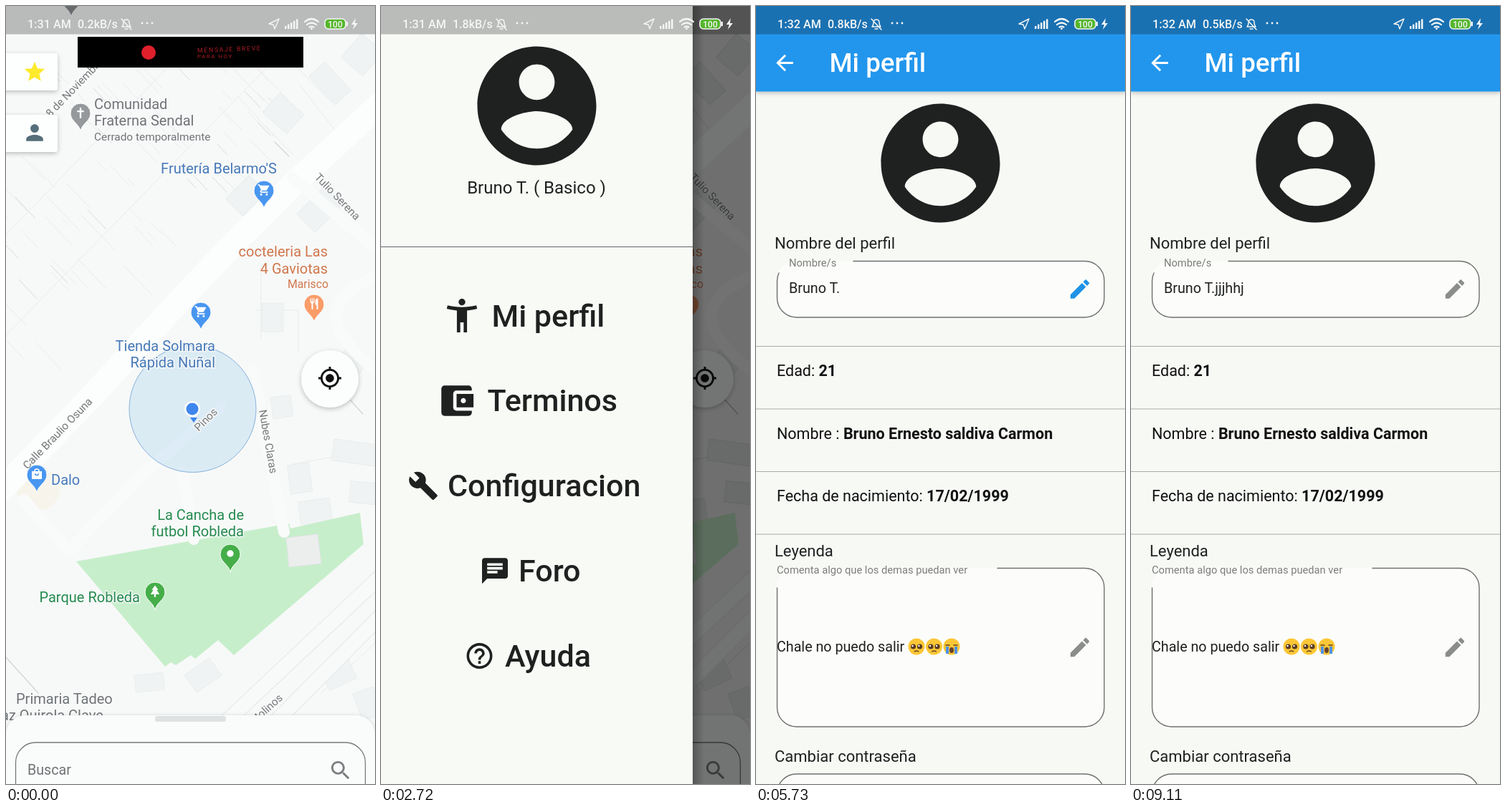
Recreate the animation shown at these times as an HTML page. Size 515 by 1087 pixels, loop 9.65 s.

```html
<!DOCTYPE html>
<html lang="es">
<head>
<meta charset="utf-8">
<style>
html, body { margin: 0; height: 100%; overflow: hidden; background: #f1f3f1; }
svg { display: block; width: 100vw; height: 100vh; }
text { font-family: Roboto, "Noto Sans", sans-serif; white-space: pre; }
.halo { paint-order: stroke; stroke: #f8f9f9; stroke-width: 3px; stroke-linejoin: round; }
.line { fill: none; stroke-linecap: round; stroke-linejoin: round; }
</style>
</head>
<body>
<svg id="stage" viewBox="0 0 515 1087"></svg>
<script>
const LOOP = 9650, INK = '#1f2120', BLUE = '#2196ed';

// 24-unit icon outlines
const ICON = {
  account: 'M12 2C6.48 2 2 6.48 2 12s4.48 10 10 10 10-4.48 10-10S17.52 2 12 2zm0 3c1.66 0 3 1.34 3 3s-1.34 3-3 3-3-1.34-3-3 1.34-3 3-3zm0 14.2c-2.5 0-4.71-1.28-6-3.22.03-1.99 4-3.08 6-3.08 1.99 0 5.97 1.09 6 3.08-1.29 1.94-3.5 3.22-6 3.22z',
  body: 'M20.5 6c-2.61.7-5.67 1-8.5 1s-5.89-.3-8.5-1L3 8c1.86.5 4 .83 6 1v13h2v-6h2v6h2V9c2-.17 4.14-.5 6-1l-.5-2zM12 6c1.1 0 2-.9 2-2s-.9-2-2-2-2 .9-2 2 .9 2 2 2z',
  wallet: 'M21 18v1c0 1.1-.9 2-2 2H5c-1.11 0-2-.9-2-2V5c0-1.1.89-2 2-2h14c1.1 0 2 .9 2 2v1h-9c-1.11 0-2 .9-2 2v8c0 1.1.89 2 2 2h9zm-9-2h10V8H12v8zm4-2.5c-.83 0-1.5-.67-1.5-1.5s.67-1.5 1.5-1.5 1.5.67 1.5 1.5-.67 1.5-1.5 1.5z',
  wrench: 'M22.7 19l-9.1-9.1c.9-2.3.4-5-1.5-6.9-2-2-5-2.4-7.4-1.3L9 6 6 9 1.6 4.7C.4 7.1.9 10.1 2.9 12.1c1.9 1.9 4.6 2.4 6.9 1.5l9.1 9.1c.4.4 1 .4 1.4 0l2.3-2.3c.5-.4.5-1.1.1-1.4z',
  chat: 'M20 2H4c-1.1 0-1.99.9-1.99 2L2 22l4-4h14c1.1 0 2-.9 2-2V4c0-1.1-.9-2-2-2zM6 9h12v2H6V9zm8 5H6v-2h8v2zm4-6H6V6h12v2z',
  help: 'M11 18h2v-2h-2v2zm1-16C6.48 2 2 6.48 2 12s4.48 10 10 10 10-4.48 10-10S17.52 2 12 2zm0 18c-4.41 0-8-3.59-8-8s3.59-8 8-8 8 3.59 8 8-3.59 8-8 8zm0-14c-2.21 0-4 1.79-4 4h2c0-1.1.9-2 2-2s2 .9 2 2c0 2-3 1.75-3 5h2c0-2.25 3-2.5 3-5 0-2.21-1.79-4-4-4z',
  edit: 'M3 17.25V21h3.75L17.81 9.94l-3.75-3.75L3 17.25zM20.71 7.04c.39-.39.39-1.02 0-1.41l-2.34-2.34c-.39-.39-1.02-.39-1.41 0l-1.83 1.83 3.75 3.75 1.83-1.83z',
  back: 'M20 11H7.83l5.59-5.59L12 4l-8 8 8 8 1.41-1.41L7.83 13H20v-2z',
  search: 'M15.5 14h-.79l-.28-.27C15.41 12.59 16 11.11 16 9.5 16 5.91 13.09 3 9.5 3S3 5.91 3 9.5 5.91 16 9.5 16c1.61 0 3.09-.59 4.23-1.57l.27.28v.79l5 4.99L20.49 19l-4.99-5zm-6 0C7.01 14 5 11.99 5 9.5S7.01 5 9.5 5 14 7.01 14 9.5 11.99 14 9.5 14z',
  person: 'M12 12c2.21 0 4-1.79 4-4s-1.79-4-4-4-4 1.79-4 4 1.79 4 4 4zm0 2c-2.67 0-8 1.34-8 4v2h16v-2c0-2.66-5.33-4-8-4z',
  star: 'M12 17.27L18.18 21l-1.64-7.03L22 9.24l-7.19-.61L12 2 9.19 8.63 2 9.24l5.46 4.73L5.82 21z',
  gps: 'M12 8c-2.21 0-4 1.79-4 4s1.79 4 4 4 4-1.79 4-4-1.79-4-4-4zm8.94 3c-.46-4.17-3.77-7.48-7.94-7.94V1h-2v2.06C6.83 3.52 3.52 6.83 3.06 11H1v2h2.06c.46 4.17 3.77 7.48 7.94 7.94V23h2v-2.06c4.17-.46 7.48-3.77 7.94-7.94H23v-2h-2.06zM12 19c-3.87 0-7-3.13-7-7s3.13-7 7-7 7 3.13 7 7-3.13 7-7 7z',
  cart: 'M7 18a2 2 0 100 4 2 2 0 000-4zM1 2v2h2l3.6 7.59-1.35 2.45C4.5 15.4 5.5 17 7 17h12v-2H7.42l-.22-.37.9-1.63h7.45c.75 0 1.41-.41 1.75-1.03l3.58-6.49A1 1 0 0020 4H5.21l-.94-2H1zm16 16a2 2 0 100 4 2 2 0 000-4z',
  cross: 'M10.5 3h3v5H18v3h-4.500v11h-3V11H6V8h4.500z',
  fork: 'M5 2h1.500v6H8V2h1.500v6H11V2h1.500v7L10 12v10H7.500V12L5 9zM19 2v20h-2.500v-8H14V7q1-5 5-5z',
  bag: 'M3 7h4a5 5 0 0110 0h4v14H3zm6 0h6a3 3 0 00-6 0zm-1 4a4 4 0 008 0h-2a2 2 0 01-4 0z',
  tree: 'M12 1l6 8h-3l5 8h-6.500v5h-3v-5H4l5-8H6z',
  dot: 'M12 6a6 6 0 100 12 6 6 0 000-12z',
  mic: 'M12 14c1.66 0 3-1.34 3-3V5c0-1.66-1.34-3-3-3S9 3.34 9 5v6c0 1.66 1.34 3 3 3zm5.3-3c0 3-2.54 5.1-5.3 5.1S6.7 14 6.7 11H5c0 3.41 2.72 6.23 6 6.72V21h2v-3.28c3.28-.48 6-3.3 6-6.72h-1.7z'
};

const text = (x, y, size, str, attrs = '') => `<text x="${x}" y="${y}" font-size="${size}" ${attrs}>${str}</text>`;
const icon = (name, x, y, s, fill, attrs = '') =>
  `<path d="${ICON[name]}" transform="translate(${x} ${y}) scale(${s}) translate(-12 -12)" fill="${fill}" ${attrs}/>`;
const rect = (x, y, w, h, fill, attrs = '') => `<rect x="${x}" y="${y}" width="${w}" height="${h}" fill="${fill}" ${attrs}/>`;
const disc = (x, y, r, fill, attrs = '') => `<circle cx="${x}" cy="${y}" r="${r}" fill="${fill}" ${attrs}/>`;
const line = (d, stroke, w = 1, attrs = '') => `<path class="line" d="${d}" stroke="${stroke}" stroke-width="${w}" ${attrs}/>`;
const group = (id, body) => `<g id="${id}">${body}</g>`;
const END = 'text-anchor="end"', MID = 'text-anchor="middle"';

const pin = (x, y, fill, name) =>
  `<path d="M${x} ${y + 25}C${x - 2} ${y + 14} ${x - 14} ${y + 11} ${x - 14} ${y}a14 14 0 0 1 28 0C${x + 14} ${y + 11} ${x + 2} ${y + 14} ${x} ${y + 25}z" fill="${fill}" stroke="#fff"/>` +
  icon(name, x, y - 1, .78, '#fff');
const label = (x, y, str, fill, attrs = '', size = 20) => text(x, y, size, str, `class="halo" fill="${fill}" ${attrs}`);
const street = (x, y, angle, str, attrs = '') =>
  label(0, 0, str, '#77797b', `transform="translate(${x} ${y}) rotate(${angle})" ${attrs}`, 15.2);

function plots() {
  let seed = 11;
  const rnd = () => (seed = seed * 16807 % 2147483647) / 2147483647;
  const scatter = (count, longest) => Array.from({ length: count }, () => {
    const x = rnd() * 390 - 20, y = 50 + rnd() * (480 - x), n = 10 + rnd() * longest;
    return `M${x.toFixed()} ${y.toFixed()}l${n.toFixed()} ${(n * 1.05).toFixed()}`;
  }).join('');
  return line(scatter(65, 38), '#d8dbda') + line(scatter(18, 18), '#b9bcbb') +
    line('M-10 470L370 80M-10 330L260 50M360 40l90 90M410 110l50 65M350 425h58v60M356 370v95M400 640l115-20M440 960l75-70', '#d6dad8') +
    line('M434 92l20 22M0 910l45 50M498 570l-20-22M375 190l20 20', '#b0b3b2', 1.3);
}

function buildings() {
  const boxes = [[497,68,40,44,40],[452,108,54,30,48],[387,150,45,36,42],[438,284,55,36,-45],[335,265,46,34,-45],
    [372,435,30,40,0],[482,498,36,30,40],[487,624,62,30,8],[410,660,30,40,-8],[432,708,44,36,-8],[498,680,36,30,6],
    [385,560,28,30,-8],[200,945,40,24,-6],[275,935,42,30,-35],[465,935,42,28,-25],[505,975,30,40,-20]];
  return boxes.map(([x, y, w, h, a]) =>
    rect(-w / 2, -h / 2, w, h, '#e5e9e8', `stroke="#dadedd" transform="translate(${x} ${y}) rotate(${a})"`)).join('');
}

function map() {
  const blue = '#4679b8', green = '#258b50', rust = '#d0774d', grey = '#707478';
  const roads = 'M-20 690L120 545 230 425 310 340 400 250 530 130';
  const lanes = 'M25 690L88 762 190 655 300 560M345 510L388 735M246 650L262 745M400 240L530 350M40 170L160 50M530 375Q455 395 462 445 475 480 530 520';
  const avenue = 'M530 790L215 1087M530 845L290 1087';
  return rect(0, 0, 515, 1087, '#f1f3f1') + plots() + buildings() + rect(0, 0, 515, 1087, '#fdfefe', 'id="haze"') +
    disc(45, 675, 30, '#f8f4e6', 'opacity=".7"') +
    '<path d="M98 776L395 723 397 730 494 708 499 752 318 907 296 886 264 912 258 907 237 921 230 917 222 923Z" fill="#c7eecb"/>' +
    '<path d="M391 743L435 738 440 779 395 784Z" fill="#eceeee" stroke="#e0e3e4"/>' +
    line(roads, '#fcfdfd', 34) + line(lanes, '#f9fafa', 16, 'stroke-linecap="butt"') +
    line(avenue, '#e4e7e6', 22) + line(avenue, '#f8f9f9', 20) +
    disc(260.5, 563, 88.500, '#4a9fe0', 'fill-opacity=".16" stroke="#86b1dc"') +
    street(62, 156, -46, '8 de Noviembre') + street(430, 240, 46, 'Tulio Serena') +
    street(30, 648, -46, 'Calle Braulio Osuna') + street(353, 565, 80, 'Nubes Claras') +
    street(269, 595, -45, 'Pinos') + street(387, 968, -42, 'Los Molinos', END) +
    disc(260, 563, 11, '#fff') + disc(260, 563, 8.500, '#3f86ee') + '<path d="M257 575h10l-5 7z" fill="#3f86ee"/>' +
    pin(91, -10, '#8a8e91', 'dot') + pin(104, 150, '#96999c', 'cross') + pin(360, 258, '#4996f0', 'cart') +
    pin(272, 428, '#4996f0', 'cart') + pin(430, 417, '#fa9c68', 'fork') + pin(43, 655, '#4996f0', 'bag') +
    pin(313, 766, '#45ae49', 'dot') + pin(208, 819, '#45ae49', 'tree') +
    label(123, 144, 'Comunidad', grey) + label(123, 167, 'Fraterna Sendal', grey) +
    label(123, 188, 'Cerrado temporalmente', grey, '', 15.4) +
    label(378, 234, "Frutería Belarmo'S", blue, END) +
    label(449, 350, 'cocteleria Las', rust, END) + label(449, 374, '4 Gaviotas', rust, END) +
    label(450, 394, 'Marisco', rust, END, 15.8) +
    label(292, 482, 'Tienda Solmara', blue, END) + label(292, 505, 'Rápida Nuñal', blue, END) +
    label(63, 669, 'Dalo', blue) +
    label(332, 718, 'La Cancha de', green, END) + label(332, 741, 'futbol Robleda', green, END) +
    label(187, 833, 'Parque Robleda', green, END) +
    label(14, 975, 'Primaria Tadeo', grey) + label(-7, 998, 'az Quirola Clave', grey) +
    rect(100, 43, 315, 43, '#000') + disc(199, 65, 10, '#e0202b') +
    text(267, 65, 9, 'MENSAJE BREVE', 'fill="#a51c24" letter-spacing="1.5" transform="rotate(-2 267 65)"') +
    text(267, 73, 8, 'PARA HOY.', 'fill="#a51c24" letter-spacing="1.5"') +
    rect(-6, 66, 78, 52, '#fdfefe', 'rx="4" filter="url(#soft)"') + icon('star', 40, 92, 1.42, '#fdea2c') +
    rect(-6, 152, 78, 52, '#fdfefe', 'rx="4" filter="url(#soft)"') + icon('person', 40, 177, 1.47, '#546e7a') +
    disc(452, 521, 40, '#fcfdfd', 'filter="url(#soft)"') + icon('gps', 452, 520, 1.45, '#111') +
    rect(0, 991, 515, 130, '#fafcfc', 'rx="27" filter="url(#soft)"') + rect(208, 992, 99, 8, '#dfe2e3', 'rx="3"') +
    rect(13.500, 1029, 488, 90, 'none', 'rx="28" stroke="#777a7b" stroke-width="1.300"') +
    text(30, 1074, 19.7, 'Buscar', 'fill="#707374"') + icon('search', 467, 1068, 1.45, '#7c7f80');
}

function drawer() {
  const items = [['Mi perfil', 154.5, 'body', 113, 2.36], ['Terminos', 148.5, 'wallet', 105.5, 2.36],
    ['Configuracion', 93, 'wrench', 59, 1.8], ['Foro', 192, 'chat', 159, 1.8], ['Ayuda', 173, 'help', 137.5, 1.8]];
  return rect(435, 0, 16, 1087, 'url(#edge)') + rect(0, 0, 435, 1087, '#f8faf6') +
    icon('account', 217.5, 139.5, 8.3, INK) + text(217, 262, 24, 'Bruno T. ( Basico )', `fill="${INK}" ${MID}`) +
    rect(0, 336, 435, 1, '#62676a') +
    items.map(([name, x, ic, ix, s], i) => {
      const y = 432.500 + 118.9 * i;
      return icon(ic, ix, y, s, INK) + text(x, y + 15, 43, name, `font-weight="500" fill="${INK}"`);
    }).join('');
}

function emoji(x, crying) {
  const y = 895;
  const face = disc(x, y, 11.500, '#fcc736');
  if (crying) return face + rect(x - 8, y, 4, 10, '#4f91e8') + rect(x + 4, y, 4, 10, '#4f91e8') +
    line(`M${x - 8} ${y - 2}h5M${x + 3} ${y - 2}h5`, '#59401f', 1.5) + `<ellipse cx="${x}" cy="${y + 5}" rx="3" ry="4" fill="#68432a"/>`;
  return face + [-4.500, 4.500].map(d => disc(x + d, y, 3.6, '#5a3c25') + disc(x + d - 1, y - 1, 1.2, '#fff')).join('') +
    line(`M${x - 3} ${y + 7}q3-2 6 0`, '#68432a', 1.3);
}

function page() {
  const border = 'M136 356.500H459a27 27 0 0 1 27 27V408a27 27 0 0 1-27 27H56.500a27 27 0 0 1-27-27V384q0-6 2.500-11';
  const row = (y, name, value) => text(29, y, 21.5, `${name} <tspan font-weight="700">${value}</tspan>`, 'fill="#111"');
  return rect(0, 0, 515, 1087, '#f7f9f5') + rect(0, 0, 515, 119.5, BLUE, 'filter="url(#soft)"') +
    icon('back', 40, 79.5, 1.47, '#fff') + text(102.5, 92, 36.7, 'Mi perfil', 'font-weight="500" fill="#fff"') +
    icon('account', 257.5, 219.5, 8.3, INK) + text(26, 339, 22, 'Nombre del perfil', `fill="${INK}"`) +
    rect(29, 356, 457, 79, '#fcfdfa', 'rx="27"') +
    line(border, '#6f716f', 1.4, 'id="idle"') + line(border, '#1e92e6', 3, 'id="focus"') +
    text(46, 364, 14.7, 'Nombre/s', 'id="hint"') + text(46, 401, 19.7, '', `id="name" fill="${INK}"`) +
    icon('edit', 452, 395.5, 1.46, '', 'id="pencil"') +
    [475, 562.500, 650, 737.500].map(y => rect(0, y, 515, 1, '#a9acaa')).join('') +
    row(517, 'Edad:', '21') + row(605, 'Nombre :', 'Bruno Ernesto saldiva Carmon') +
    row(692, 'Fecha de nacimiento:', '17/02/1999') + text(26, 769, 22, 'Leyenda', `fill="${INK}"`) +
    rect(29, 785, 457, 222, '#fcfdfa', 'rx="27"') +
    line('M337 785.500H459a27 27 0 0 1 27 27V980a27 27 0 0 1-27 27H56.500a27 27 0 0 1-27-27V813', '#6f716f', 1.4) +
    text(29, 793, 14.7, 'Comenta algo que los demas puedan ver', 'fill="#7b7d7b"') +
    text(29, 902, 19.7, 'Chale no puedo salir', `fill="${INK}"`) + emoji(224) + emoji(248.500) + emoji(273, true) +
    icon('edit', 452, 896, 1.46, '#8b8d8b') + text(26, 1056, 22, 'Cambiar contraseña', `fill="${INK}"`) +
    rect(29.500, 1073, 456.500, 79, '#fcfdfa', 'rx="27" stroke="#6f716f" stroke-width="1.400"');
}

function keyboard() {
  const key = (x, y, c) => text(x, y, 33, c, `fill="#f4f4f4" ${MID}`);
  const keys = (str, x, y) => [...str].map((c, i) => key(x + 50.8 * i, y, c)).join('');
  const soft = '#b9bbb9';
  return rect(0, 731, 515, 356, '#000') + rect(0, 731, 515, 63, '#333633') +
    disc(35, 762, 21.500, '#fff') + line('M31 755l8 7-8 7', '#555', 3) +
    rect(182.500, 745, 1, 35, '#505350') + rect(328.500, 745, 1, 35, '#505350') +
    text(118, 772, 25, '', `id="word1" fill="#c9cbc9" ${MID}`) + text(255, 772, 25, '', `id="word2" fill="#c9cbc9" ${MID}`) +
    icon('mic', 486, 762, 1.42, soft) +
    keys('qwertyuiop', 28, 841) + keys('asdfghjklñ', 28, 914) + keys('zxcvbnm', 104, 985) +
    [...'1234567890'].map((c, i) => text(43 + 50.9 * i, 818, 14.5, c, `fill="${soft}" font-weight="500" ${MID}`)).join('') +
    line('M41 964l-12 13h6v11h12v-11h6z', soft, 2.5) +
    line('M468 965h19v23h-19l-9-11.500zM471 971l10 11M481 971l-10 11', soft, 2.3) +
    text(41, 1053, 20.5, '?123', `fill="${soft}" font-weight="500" ${MID}`) + key(104, 1056, ',') + key(410, 1056, '.') +
    disc(154, 1046, 13, 'none', `stroke="${soft}" stroke-width="2.500"`) + disc(149, 1042, 2, soft) + disc(159, 1042, 2, soft) +
    line('M147 1049q7 8 14 0', soft, 2.2) +
    rect(195, 1030, 175, 32, '#767876', 'rx="4"') + rect(444, 1025, 60, 41, '#80cbc4', 'rx="14"') +
    line('M462 1046l8 8 16-16', '#fff', 3.2);
}

function statusBar() {
  const w = '#f4f6f6', bold = `font-weight="500" fill="${w}"`;
  return rect(0, 0, 515, 39.5, '#000', 'fill-opacity=".25"') +
    text(30, 31, 16.2, '', `id="clock" ${bold}`) + text(100, 31, 16, '', `id="rate" ${bold}`) +
    line('M162 29q2-2 2-6 0-4 4-4t4 4q0 4 2 6zM166 32h4M161 18l14 15', w, 1.5) +
    [190, 197, 204].map(x => disc(x, 24, 1.4, w)).join('') +
    line('M367 25l14-7-6 14-2-6z', w, 1.4) +
    [0, 1, 2, 3, 4].map(i => rect(389 + 4 * i, 28 - 2.4 * i, 2.5, 4 + 2.4 * i, w)).join('') +
    line('M417 22q9.500-8 19 0M420 26q6.500-5 13 0M423.500 29.500q3-2 6 0', w, 2.2) + disc(426.500, 31.500, 1.5, w) +
    rect(445, 18, 29, 14, '#55b62c', `rx="5" stroke="${w}" stroke-width="1.600"`) + rect(475, 22, 2, 6, w) +
    text(459.500, 29.500, 12, '100', `${bold} ${MID}`) + `<path d="M488 17l-6 9h4l-2 7 7-9h-4z" fill="${w}"/>`;
}

const stage = document.getElementById('stage');
stage.innerHTML = `<defs>
  <filter id="soft" x="-20%" y="-20%" width="140%" height="150%"><feDropShadow dx="0" dy="2" stdDeviation="3" flood-opacity=".25"/></filter>
  <linearGradient id="edge"><stop stop-opacity=".25"/><stop offset="1" stop-opacity="0"/></linearGradient></defs>` +
  map() + rect(0, 0, 515, 1087, '#000', 'id="scrim"') + group('drawer', drawer()) + group('page', page()) +
  group('keyboard', keyboard()) + group('status', statusBar());

const $ = id => document.getElementById(id);
const set = (id, name, value) => $(id).setAttribute(name, value);
const ramp = (t, a, b) => Math.min(1, Math.max(0, (t - a) / (b - a)));
const step = (t, stops) => stops.filter(([at]) => t >= at).pop()[1];

function bezier(x1, y1, x2, y2) {
  const at = (s, a, b) => 3 * (1 - s) ** 2 * s * a + 3 * (1 - s) * s * s * b + s ** 3;
  return x => {
    let lo = 0, hi = 1;
    for (let i = 0; i < 24; i++) at((lo + hi) / 2, x1, x2) < x ? lo = (lo + hi) / 2 : hi = (lo + hi) / 2;
    return at(hi, y1, y2);
  };
}
const swift = bezier(.4, 0, .2, 1), easeIn = bezier(.42, 0, 1, 1);

function spring(ms) {
  const k = Math.max(0, ms) * .0224;
  return 1 - (1 + k) * Math.exp(-k);
}

function draw(t) {
  set('haze', 'opacity', .45 * (1 - ramp(t, 370, 1320)));

  const open = spring(t - 1342);
  set('scrim', 'opacity', .54 * open);
  set('drawer', 'transform', `translate(${435 * (open - 1)} 0)`);
  set('drawer', 'visibility', open > 0 ? 'visible' : 'hidden');

  const enter = ramp(t, 3419, 3719);
  set('page', 'opacity', easeIn(enter));
  set('page', 'visibility', enter > 0 ? 'visible' : 'hidden');
  set('page', 'transform', `translate(0 ${272 * (1 - swift(enter))})`);

  const focus = ramp(t, 5730, 5900) - ramp(t, 8740, 8900);
  const active = t >= 5730 && t < 8740;
  set('idle', 'opacity', 1 - focus);
  set('focus', 'opacity', focus);
  set('hint', 'fill', focus > .5 ? '#1e92e6' : '#7b7d7b');
  set('pencil', 'fill', active ? '#1e92e6' : '#8b8d8b');

  const count = [7050, 7400, 7700, 8000, 8250, 8500].filter(at => t >= at).length;
  const word = 'T.' + 'jjjhhj'.slice(0, count);
  $('name').textContent = 'Bruno ' + word;
  $('word1').textContent = count ? word : '';
  $('word2').textContent = count ? word.toLowerCase() : '';

  const shown = swift(ramp(t, 5780, 6080)) - swift(ramp(t, 8760, 9090));
  set('keyboard', 'transform', `translate(0 ${356 * (1 - shown)})`);
  set('keyboard', 'visibility', shown > 0 ? 'visible' : 'hidden');

  $('clock').textContent = step(t, [[0, '1:31 AM'], [4740, '1:32 AM']]);
  $('rate').textContent = step(t, [[0, '0.2kB/s'], [900, '1.8kB/s'], [4870, '0.8kB/s'], [8740, '0.5kB/s']]);
}

const start = performance.now();
function frame() {
  draw((performance.now() - start) % LOOP);
  requestAnimationFrame(frame);
}
frame();
</script>
</body>
</html>
```
